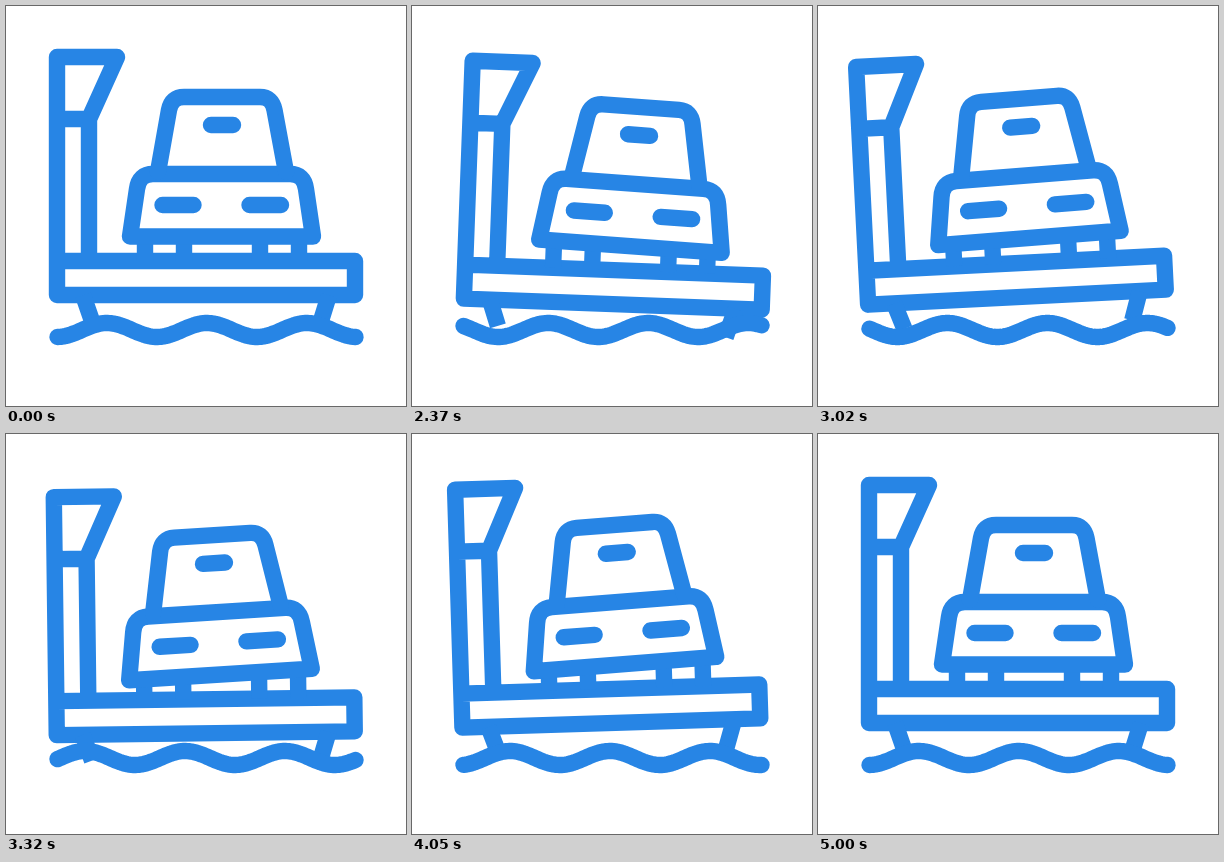
Animation of 400 by 400 pixels, one loop 5020 ms. Source, as an HTML page:

```html
<!DOCTYPE html>
<html>
<head>
<meta charset="utf-8">
<style>
  html, body { margin: 0; width: 100%; height: 100%; overflow: hidden; background: #fff; }
  svg { display: block; width: 100vw; height: 100vh; }
  path { fill: none; stroke: #2785e5; stroke-width: 16.4; stroke-linecap: round; stroke-linejoin: round; }
  .butt { stroke-linecap: butt; }
</style>
</head>
<body>
<svg viewBox="0 0 400 400">
  <g id="boat">
    <path d="M51 255V51H111L83 113V255M51 113H83M51 255H349V289H51Z"/>
    <path class="butt" d="M77 289L86 315M323 289L314 318"/>
    <path class="butt" d="M139 231V255M178 231V255M254 231V255M293 231V255"/>
    <g id="car">
      <path d="M124 230.500L131 183Q133 168 147 168H284Q298 168 300 183L307 230.500Z"/>
      <path d="M152 166L163 104Q165.500 91 178 91H254Q266 91 268.500 104L280 166"/>
      <path d="M156.500 199H187.500M243.500 199H275M205 119H227"/>
    </g>
  </g>
  <path id="wave"/>
</svg>
<script>
const LOOP = 5020, START = 2020, MOVE = 2980;
const el = id => document.getElementById(id);

// Keys are [time, value] pairs, eased in and out between neighbours.
const tilt = [[0, 0], [500, 2.7], [1065, -3.1], [1615, 3], [2210, -3.1], [2720, 1.5], [MOVE, 0]];
const sink = [[0, 0], [430, 10], [840, 0], [1420, 11.5], [2030, 0], [2720, 3], [MOVE, 0]];
const sway = [[0, 0], [650, 3.7], [1200, -3.9], [1640, 3.8], [2150, -3.8], [2740, 2], [MOVE, 0]];

function ease(keys, t) {
  const i = Math.max(1, keys.findIndex(k => k[0] >= t));
  const [t0, a] = keys[i - 1], [t1, b] = keys[i];
  const u = (t - t0) / (t1 - t0);
  return a + (b - a) * u * u * (3 - 2 * u);
}

function wavePath(shift) {
  let d = "";
  for (let x = 51.5; x <= 350; x += 2) {
    const y = 324 - 7 * Math.cos((x - 101 - shift) * Math.PI / 50);
    d += (d ? "L" : "M") + x + " " + y.toFixed(2);
  }
  return d;
}

function draw(now) {
  const t = Math.min(MOVE, Math.max(0, now % LOOP - START));
  const u = t / MOVE;
  el("boat").setAttribute("transform", `translate(0 ${ease(sink, t)}) rotate(${ease(tilt, t)} 200 310)`);
  el("car").setAttribute("transform", `rotate(${ease(sway, t)} 215.5 231)`);
  el("wave").setAttribute("d", wavePath(400 * (u + u * (1 - u) * (u - 0.4))));
}

let begin;
function tick(now) {
  begin ??= now;
  draw(now - begin);
  requestAnimationFrame(tick);
}
draw(0);
requestAnimationFrame(tick);
</script>
</body>
</html>
```
